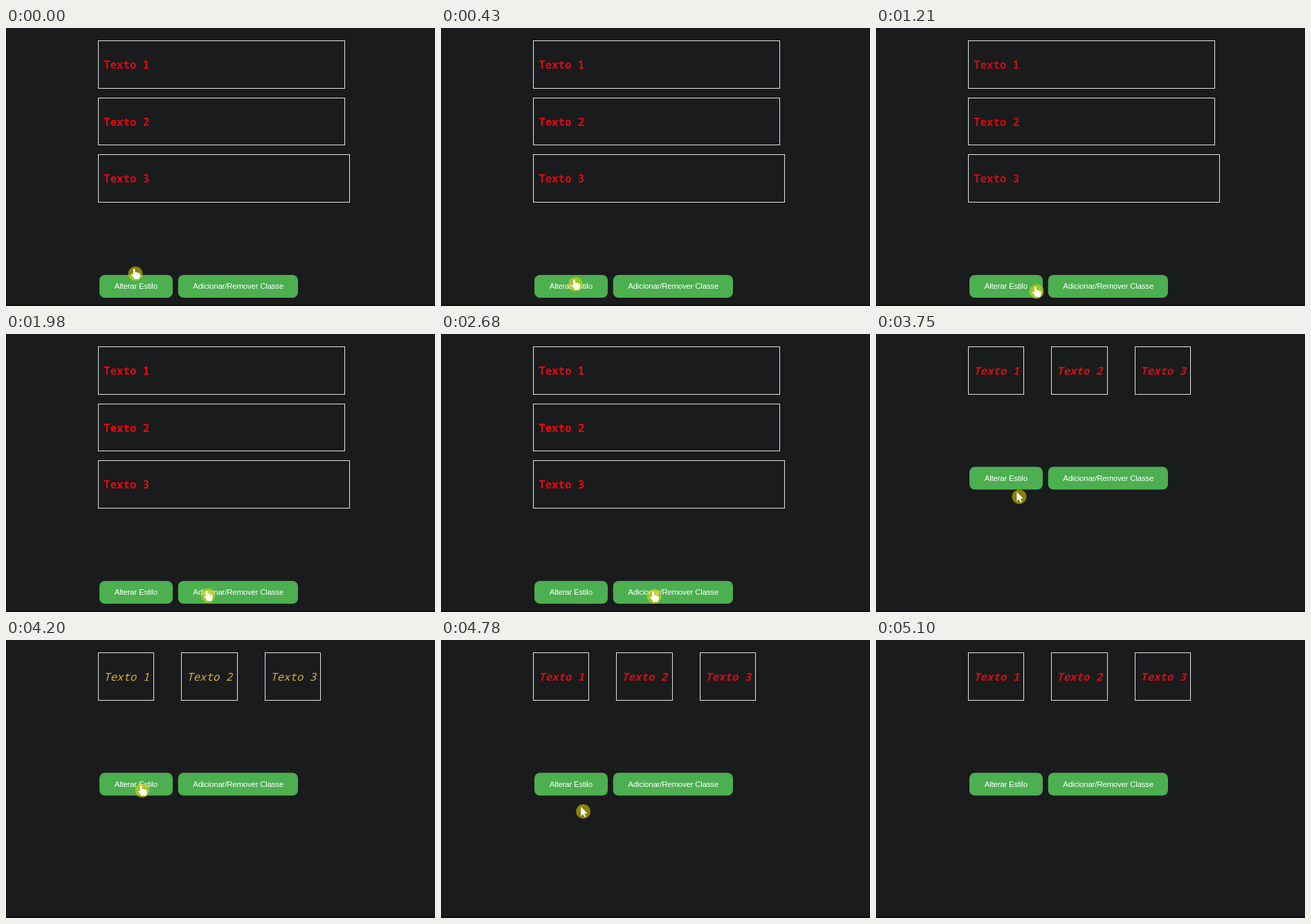
These frames come from a looping animation (620x403 px, 5390 ms). An HTML page with a canvas:

```html
<!DOCTYPE html>
<html lang="pt">
<head>
<meta charset="utf-8">
<title>Textos</title>
<style>
html, body { margin: 0; width: 100%; height: 100%; overflow: hidden; background: #1a1b1d; }
canvas { display: block; }
</style>
</head>
<body>
<canvas id="stage" width="620" height="403"></canvas>
<script>
const ctx = document.getElementById('stage').getContext('2d');
const LOOP = 5390;
const MONO = '"Noto Sans Mono", "DejaVu Sans Mono", monospace';
const SANS = '"Liberation Sans", Arial, sans-serif';
const ROW_AT = 2980;

// time, x, y of the pointer halo
const path = [
  [0, 187, 356], [530, 196, 375], [820, 203, 381], [1110, 203, 381],
  [1210, 232, 382], [1600, 287, 380], [1980, 292, 379], [2500, 292, 379],
  [2780, 317, 381], [3380, 317, 381], [3750, 207, 236], [3950, 197, 218],
  [4690, 197, 218], [4860, 213, 275], [5100, 240, 424]
];

// start time, colour, weight of the texts
const looks = [
  [0, '#e6060c', 600], [620, '#dcae3c', 400], [820, '#d00a13', 600],
  [1980, '#f4040a', 800], [ROW_AT, '#d00f13', 600], [4060, '#dcae3c', 400],
  [4320, '#d00f13', 600]
];

function pointerAt(t) {
  const i = path.findIndex(p => p[0] > t);
  if (i < 0) return null;
  const [t0, x0, y0] = path[i - 1], [t1, x1, y1] = path[i];
  const k = (t - t0) / (t1 - t0);
  return { x: x0 + (x1 - x0) * k, y: y0 + (y1 - y0) * k };
}

function write(text, x, y, font, color) {
  ctx.font = font;
  ctx.fillStyle = color;
  ctx.fillText(text, x, y);
}

function drawBoxes(t, row) {
  const [, color, weight] = looks.filter(l => l[0] <= t).pop();
  const font = `${row ? 'italic ' : ''}${weight} 15.7px ${MONO}`;
  ctx.lineWidth = 1;
  ctx.strokeStyle = '#e4e4e4';
  for (let i = 0; i < 3; i++) {
    const dx = row ? i * 120.3 : 0;
    const dy = row ? 0 : i * 82.5;
    const left = Math.floor(133.4 + dx);
    const top = Math.round(18.4 + dy);
    const right = row ? Math.floor(213.9 + dx) : i < 2 ? 489 : 496;
    const bottom = Math.round(86.9 + dy);
    ctx.strokeRect(left + 0.5, top + 0.5, right - left, bottom - top);
    write('Texto ' + (i + 1), left + 8.3, top + 41, font, color);
  }
}

function drawButton(x, y, w, label, pad) {
  ctx.fillStyle = '#4caf50';
  ctx.beginPath();
  ctx.roundRect(x, y, w, 33, 8);
  ctx.fill();
  ctx.letterSpacing = '-0.22px';
  write(label, x + pad, y + 20, `11.5px ${SANS}`, '#fff');
  ctx.letterSpacing = '0px';
}

function drawHand() {
  ctx.beginPath();
  ctx.roundRect(-4, -8, 3, 11, 1.5);
  ctx.roundRect(-0.7, -3, 2.3, 7, 1.1);
  ctx.roundRect(1.9, -2.5, 2.2, 7, 1.1);
  ctx.roundRect(4.4, -1.5, 2, 6, 1);
  ctx.fill();
  ctx.beginPath();
  ctx.moveTo(-4, 2);
  ctx.lineTo(-5.6, -0.3);
  ctx.quadraticCurveTo(-7.4, -0.5, -6.8, 1.2);
  ctx.lineTo(-3, 6);
  ctx.lineTo(-2.4, 8);
  ctx.lineTo(4.8, 8);
  ctx.lineTo(6.4, 3.5);
  ctx.lineTo(6.4, 1);
  ctx.lineTo(-4, 1);
  ctx.fill();
}

function drawArrow() {
  ctx.beginPath();
  ctx.moveTo(-3.5, -7);
  ctx.lineTo(-3.5, 6.5);
  ctx.lineTo(-0.5, 3.7);
  ctx.lineTo(1.7, 8.3);
  ctx.lineTo(3.8, 7.3);
  ctx.lineTo(1.7, 2.9);
  ctx.lineTo(5.8, 2.7);
  ctx.closePath();
  ctx.fill();
}

function drawPointer(t, row) {
  const p = pointerAt(t);
  if (!p) return;
  const onButton = p.y < 225 && p.y > 193;
  const hand = !row || t < 3090 || onButton;
  ctx.save();
  ctx.translate(p.x, p.y);
  ctx.fillStyle = 'rgba(230,215,0,0.55)';
  ctx.beginPath();
  ctx.arc(0, 0, 10.5, 0, Math.PI * 2);
  ctx.fill();
  ctx.fillStyle = '#fff';
  if (hand) {
    ctx.translate(0.5, 0.5);
    ctx.scale(0.94, 0.94);
    drawHand();
  } else {
    drawArrow();
  }
  ctx.restore();
}

function draw(t) {
  const row = t >= ROW_AT;
  ctx.fillStyle = '#1a1b1d';
  ctx.fillRect(0, 0, 620, 403);
  ctx.fillStyle = '#100f10';
  ctx.fillRect(0, 401, 620, 2);
  drawBoxes(t, row);
  const y = row ? 192.5 : 358;
  drawButton(135, y, 106, 'Alterar Estilo', 21.7);
  drawButton(248.7, y, 173.3, 'Adicionar/Remover Classe', 21.5);
  drawPointer(t, row);
}

function tick() {
  draw(performance.now() % LOOP);
  requestAnimationFrame(tick);
}
tick();
</script>
</body>
</html>
```
